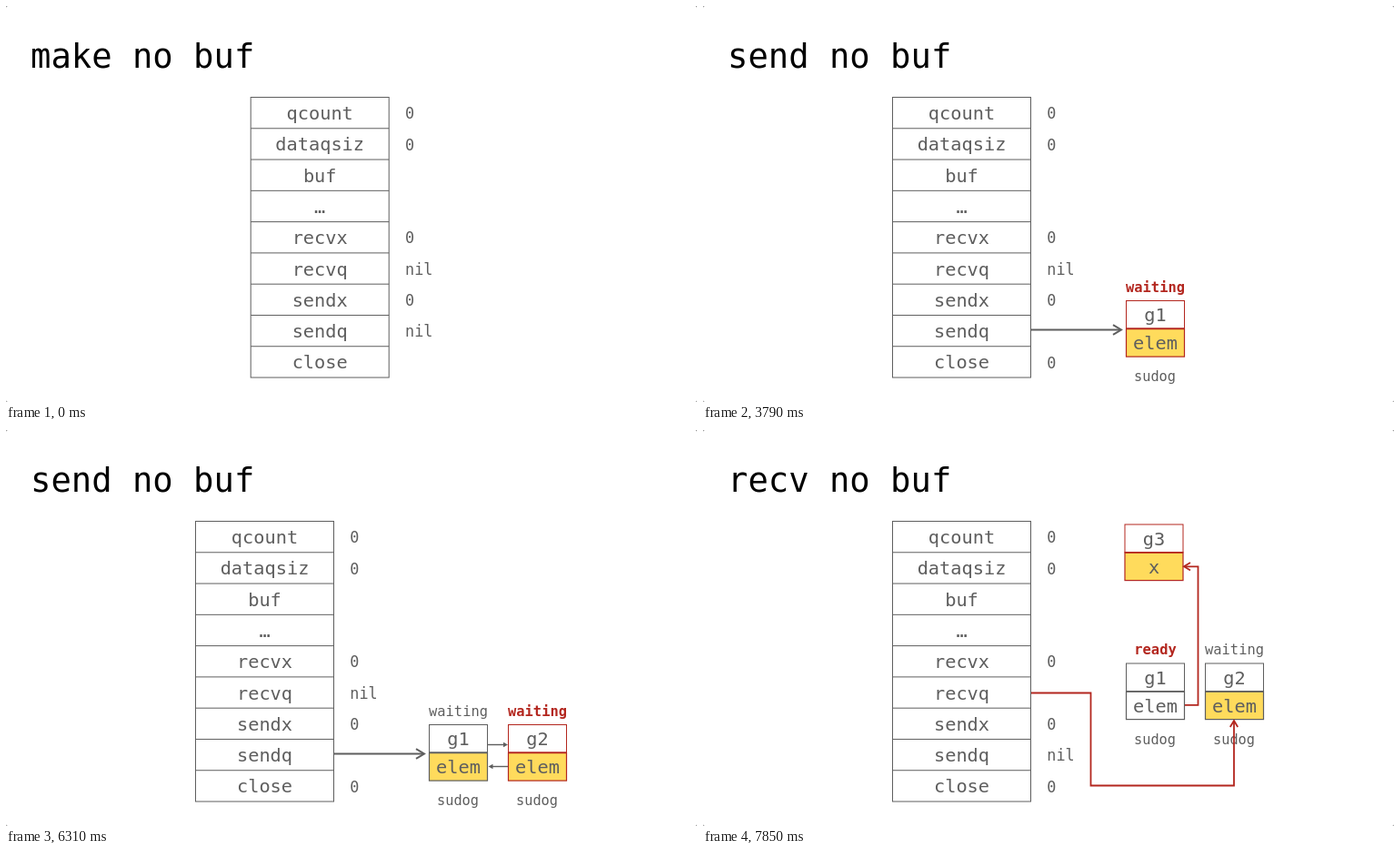
These frames come from a looping animation (760x436 px, 8000 ms). An HTML page:

```html
<!DOCTYPE html>
<html lang="en">
<head>
<meta charset="utf-8">
<title>Unbuffered channel</title>
<style>
  html, body { margin: 0; width: 100%; height: 100%; overflow: hidden; background: #8a8a8a; }
  svg { display: block; width: 760px; height: 436px; font-family: "DejaVu Sans Mono", monospace; }
  text { white-space: pre; }
</style>
</head>
<body>
<svg id="stage" viewBox="0 0 760 436">
  <rect width="760" height="436" rx="2.5" fill="#fff"/>
</svg>
<script>
const NS = 'http://www.w3.org/2000/svg';
const GREY = '#5e5e5e', RED = '#b3261e', YELLOW = '#ffdb5c';
const FIELDS = ['qcount', 'dataqsiz', 'buf', '…', 'recvx', 'recvq', 'sendx', 'sendq', 'close'];
const TOP = 100.5, ROW = 34.28, LOOP = 8000;
const stage = document.getElementById('stage');

function add(parent, tag, attrs, content) {
  const el = document.createElementNS(NS, tag);
  for (const key in attrs) el.setAttribute(key, attrs[key]);
  if (content) el.textContent = content;
  parent.appendChild(el);
  return el;
}

function label(g, content, x, y, size, fill = GREY, weight = 400) {
  add(g, 'text', {
    x, y, fill, 'font-size': size, 'font-weight': weight, 'text-anchor': 'middle'
  }, content);
}

function line(g, d, stroke, width) {
  add(g, 'path', { d, stroke, 'stroke-width': width, fill: 'none' });
}

function title(g, content) {
  add(g, 'text', { x: 27, y: 68, 'font-size': 37.2, fill: '#000' }, content);
}

// values: row index -> text shown to the right of the row
function table(g, left, values) {
  const width = 152, height = ROW * FIELDS.length;
  add(g, 'rect', { x: left, y: TOP, width, height, fill: 'none', stroke: GREY });
  FIELDS.forEach((name, i) => {
    const y = TOP + i * ROW;
    if (i) line(g, `M${left} ${y}h${width}`, GREY, 1);
    label(g, name, left + width / 2, y + 24.7, 20.3);
    if (values[i]) {
      const x = left + (values[i] === 'nil' ? 185 : 174.8);
      label(g, values[i], x, y + 23.8, 16.8);
    }
  });
}

function pair(g, x, y, names, color, fill) {
  const w = 64, h = 30.8;
  add(g, 'rect', { x, y, width: w, height: h, fill: '#fff', stroke: color });
  add(g, 'rect', { x, y: y + h, width: w, height: h, fill, stroke: color, 'stroke-width': 1.2 });
  line(g, `M${x} ${y + h}h${w}`, color, 1.8);
  label(g, names[0], x + w / 2, y + 22.5, 20.3);
  label(g, names[1], x + w / 2, y + 53.5, 20.3);
}

function sudog(g, x, y, name, state, color, fill, stateColor = color) {
  pair(g, x, y, [name, 'elem'], color, fill);
  label(g, state, x + 32, y - 9.8, 15.4, stateColor, stateColor === RED ? 700 : 400);
  label(g, 'sudog', x + 31.5, y + 88.7, 15.3);
}

// open arrowhead with its tip at x, y, turned by angle
function head(g, x, y, angle, size, color, width) {
  add(g, 'path', {
    d: `M${-size} ${-size * 0.6}L0 0L${-size} ${size * 0.6}`,
    transform: `translate(${x} ${y}) rotate(${angle})`,
    stroke: color, 'stroke-width': width, fill: 'none'
  });
}

function smallArrow(g, from, to, y) {
  const dir = Math.sign(to - from);
  line(g, `M${from} ${y}H${to - dir * 3}`, GREY, 1.4);
  add(g, 'path', { d: `M${to} ${y}l${-dir * 5} -2.8v5.6z`, fill: GREY });
}

function sendBase(g) {
  title(g, 'send no buf');
  table(g, 208.5, { 0: '0', 1: '0', 4: '0', 5: 'nil', 6: '0', 8: '0' });
  line(g, 'M361 356.5H459', GREY, 2);
  head(g, 460, 356.5, 0, 9, GREY, 2);
}

function make(g) {
  title(g, 'make no buf');
  table(g, 269.2, { 0: '0', 1: '0', 4: '0', 5: 'nil', 6: '0', 7: 'nil' });
}

function sendOne(g) {
  sendBase(g);
  sudog(g, 465.5, 324.5, 'g1', 'waiting', RED, YELLOW);
}

function sendTwo(g) {
  sendBase(g);
  sudog(g, 465.5, 324.5, 'g1', 'waiting', GREY, YELLOW);
  sudog(g, 552.5, 324.5, 'g2', 'waiting', RED, YELLOW);
  smallArrow(g, 530, 552, 346.5);
  smallArrow(g, 552, 530.5, 370.5);
}

function receive(g) {
  title(g, 'recv no buf');
  table(g, 208.5, { 0: '0', 1: '0', 4: '0', 6: '0', 7: 'nil', 8: '0' });
  pair(g, 464, 104, ['g3', 'x'], RED, YELLOW);
  sudog(g, 465.5, 257, 'g1', 'ready', GREY, '#fff', RED);
  sudog(g, 552.5, 257, 'g2', 'waiting', GREY, YELLOW);
  line(g, 'M361 289.5H426.5V391.5H584V321', RED, 1.8);
  head(g, 584, 320, -90, 7, RED, 1.8);
  line(g, 'M530 302.8H544.5V150.3H530', RED, 1.8);
  head(g, 529, 150.3, 180, 7, RED, 1.8);
}

const scenes = [[0, make], [500, sendOne], [3860, sendTwo], [6380, receive]].map(([start, draw]) => {
  const group = add(stage, 'g', { visibility: 'hidden' });
  draw(group);
  return { start, group };
});

function render(time) {
  const current = scenes.filter(s => s.start <= time).pop();
  for (const s of scenes) s.group.setAttribute('visibility', s === current ? 'visible' : 'hidden');
}

const began = performance.now();
function tick() {
  render((performance.now() - began) % LOOP);
  requestAnimationFrame(tick);
}
tick();
</script>
</body>
</html>
```
